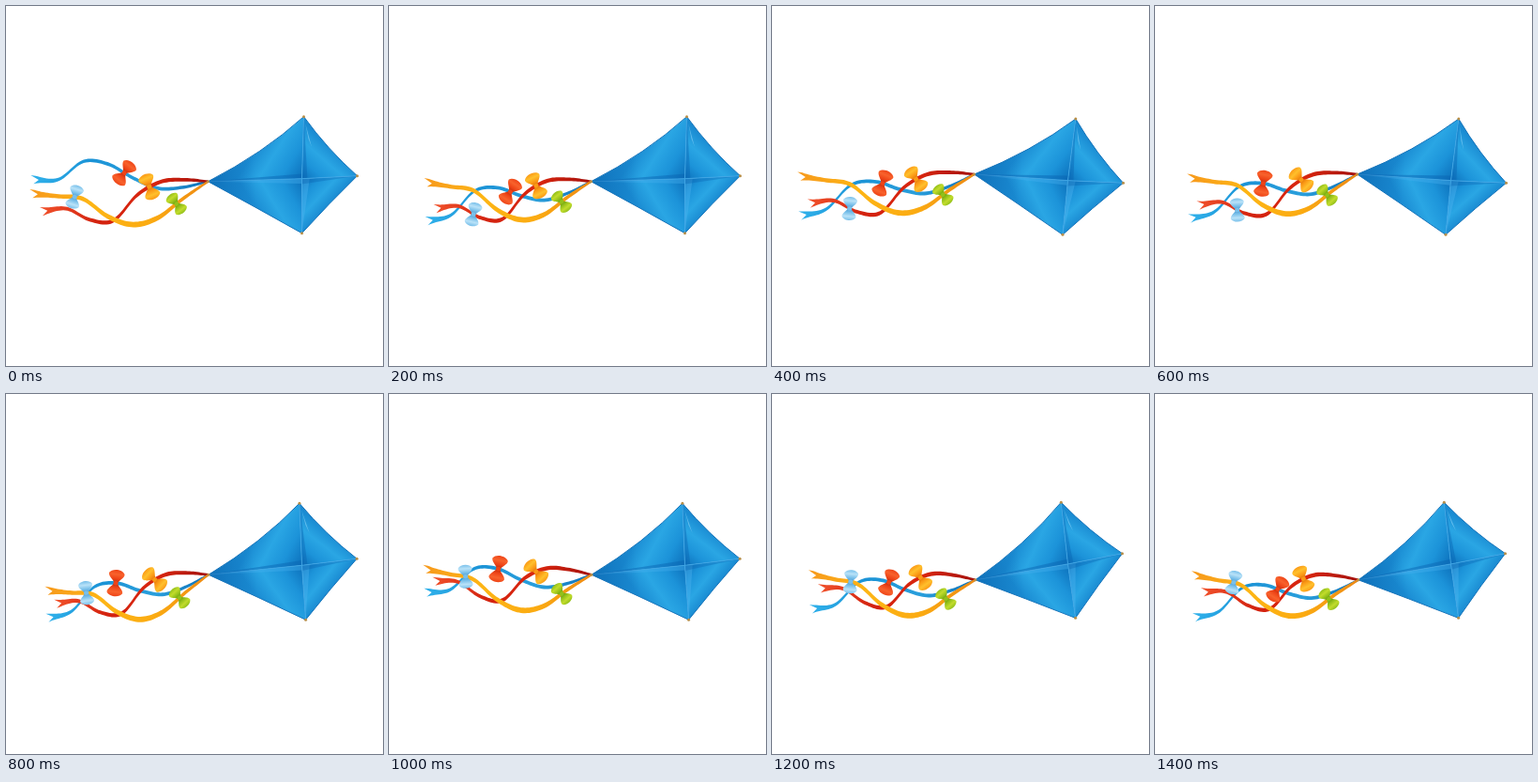
Write an HTML page with a canvas that moves like this. It is 402 px wide and 383 px high and loops after 1.6 s.

```html
<!DOCTYPE html>
<html lang="en">
<head>
<meta charset="utf-8">
<title>Kite</title>
<style>
html, body { margin: 0; width: 100%; height: 100%; overflow: hidden; background: #fff; }
canvas { display: block; }
</style>
</head>
<body>
<canvas id="stage" width="402" height="383"></canvas>
<script>
const ctx = document.getElementById('stage').getContext('2d');
const BEAT = 200, BEATS = 8;

// The kite tilts every second beat; the tails stretch and swing on each beat
const tilts = [0, 5.5, -4, -8];
const stretch = [1.07, 1, 1.06, 1.02, 0.98, 1.01, 1, 1];

// rest: heights below the knot, evenly spaced from knot to tail
const blue = {
  length: 174, width: 1.7,
  rest: [0, 12, 19, 14, 5, 8, 33, 39],
  swing: [-41, 3, 5, 8, 7, -20, -8, 1],
  tones: ['#0c70b8', '#2a9fdc', '#1b93d6', '#2fb0ea']
};
const red = {
  length: 165, width: 2,
  rest: [0, -2, 0, 14, 41, 40, 28, 31],
  swing: [1, -2, 0, 2, 0, -24, -22, -18],
  tones: ['#a3100c', '#d9260f', '#d3220f', '#f0502a']
};
const gold = {
  length: 175, width: 2.6,
  rest: [0, 17, 36, 42, 32, 12, 8, 4],
  swing: [9, -3, -2, 0, 13, -10, -10, -9],
  tones: ['#ee8a14', '#fbab12', '#fdb515', '#f79a1c']
};

// at: place along the ribbon; slip and rock vary place and angle over the loop
const bows = [
  { on: gold, at: 0.76, slip: 0, angle: 95, rock: 12, size: 12.5, tones: ['#b9e2f8', '#79c0ea', '#4a97cf'] },
  { on: blue, at: 0.53, slip: -0.05, angle: 112, rock: 15, size: 14, tones: ['#f8622c', '#ee4417', '#b92a0d'] },
  { on: red, at: 0.355, slip: 0, angle: 55, rock: 13, size: 14, tones: ['#ffc02c', '#fb9a16', '#dd7008'] },
  { on: gold, at: 0.18, slip: 0, angle: 50, rock: 3, size: 12, tones: ['#c2dc2c', '#93c01a', '#5f9410'] }
];

const mix = (p, q, t) => p.map((v, i) => v + (q[i] - v) * t);

function gradient(p, q, tones) {
  const g = ctx.createLinearGradient(...p, ...q);
  tones.forEach((c, i) => g.addColorStop(i / (tones.length - 1), c));
  return g;
}

function fillPoly(points, style) {
  ctx.beginPath();
  points.forEach(p => ctx.lineTo(...p));
  ctx.closePath();
  ctx.fillStyle = style;
  ctx.fill();
}

function line(p, q, color) {
  ctx.beginPath();
  ctx.moveTo(...p);
  ctx.lineTo(...q);
  ctx.strokeStyle = color;
  ctx.lineWidth = 0.9;
  ctx.stroke();
}

function kiteAt(beat) {
  const tilt = tilts[beat >> 1], a = tilt * Math.PI / 180;
  const turn = (x, y) => [
    315.5 + x * Math.cos(a) - y * Math.sin(a),
    183.7 + 0.35 * tilt + x * Math.sin(a) + y * Math.cos(a)
  ];
  return {
    top: turn(2, -66), right: turn(59, -3), bottom: turn(0, 58),
    left: turn(-100, 3), mid: turn(0, 0)
  };
}

// Smooth curve through evenly spaced heights
function spline(ys, t) {
  const u = t * (ys.length - 1), i = Math.min(Math.floor(u), ys.length - 2), f = u - i;
  const b = ys[i], c = ys[i + 1];
  const a = ys[i - 1] ?? 2 * b - c, d = ys[i + 2] ?? 2 * c - b;
  return b + f / 2 * (c - a + f * (2 * a - 5 * b + 4 * c - d + f * (3 * (b - c) + d - a)));
}

function ribbonPoint(r, knot, beat, s) {
  return [
    knot[0] - r.length * stretch[beat] * s,
    knot[1] + spline(r.rest, s) + r.swing[beat] * s
  ];
}

function drawRibbon(r, knot, beat) {
  const upper = [], lower = [], n = 80;
  for (let i = 0; i <= n; i++) {
    const s = i / n, [x, y] = ribbonPoint(r, knot, beat, s);
    const w = 1.2 + (r.width - 0.9) * Math.sin(Math.PI * s ** 0.8) + 3.4 * Math.exp((s - 1) * 15);
    upper.push([x, y - w]);
    lower.push([x, y + w]);
  }
  // Forked tail
  upper[n][0] -= 3;
  const tail = ribbonPoint(r, knot, beat, 1);
  const notch = ribbonPoint(r, knot, beat, 0.97);
  fillPoly([...upper, notch, ...lower.reverse()], gradient(knot, [tail[0], knot[1]], r.tones));
}

function drawBow([x, y], angle, r, [light, main, dark]) {
  ctx.save();
  ctx.translate(x, y);
  ctx.rotate(angle * Math.PI / 180);
  for (const side of [r, -r]) {
    ctx.beginPath();
    ctx.moveTo(0, -1.5);
    ctx.bezierCurveTo(side * 0.3, -4, side * 0.45, -r * 0.6, side * 0.72, -r * 0.6);
    ctx.bezierCurveTo(side * 1.1, -r * 0.4, side * 1.1, r * 0.4, side * 0.72, r * 0.6);
    ctx.bezierCurveTo(side * 0.45, r * 0.6, side * 0.3, 4, 0, 1.5);
    ctx.fillStyle = gradient([0, 0], [side, 0], [dark, main, light, main]);
    ctx.fill();
  }
  ctx.beginPath();
  ctx.ellipse(0, 0, 2.2, 2.6, 0, 0, 7);
  ctx.fillStyle = main;
  ctx.fill();
  ctx.restore();
}

function drawKite({ top, right, bottom, left, mid }) {
  const corners = [left, top, right, bottom];
  const dips = [0.15, 0.1, 0.03, 0.01];
  const side = (i, from) => {
    const p = corners[i], q = corners[(i + 1) % 4];
    if (from) ctx.moveTo(...p);
    ctx.quadraticCurveTo(...mix(mix(p, q, 0.5), mid, dips[i]), ...q);
    return mix(p, q, 0.5);
  };

  for (let i = 0; i < 4; i++) {
    ctx.beginPath();
    const outer = side(i, true);
    ctx.lineTo(...mid);
    ctx.closePath();
    ctx.fillStyle = gradient(outer, mid, ['#1a8bd2', '#2aa6e4', '#1c93d9', '#0c70bb']);
    ctx.fill();
  }

  // Folds along the spars
  fillPoly([left, mix(mid, top, 0.08), mid], 'rgba(9,98,176,.45)');
  fillPoly([left, mid, mix(mid, bottom, 0.09)], 'rgba(70,175,238,.4)');
  fillPoly([top, mix(mid, right, 0.1), mid], 'rgba(9,98,176,.4)');
  fillPoly([bottom, mid, mix(mid, right, 0.14)], 'rgba(80,180,240,.4)');
  fillPoly([right, mid, mix(mid, bottom, 0.1)], 'rgba(9,98,176,.35)');
  const glint = t => mix(mix(top, mid, t), right, t * 0.4);
  fillPoly([glint(0.08), glint(0.4), mix(glint(0.25), mid, 0.05)], 'rgba(130,206,246,.65)');
  for (const p of corners) line(p, mid, '#3fa6e6');

  ctx.beginPath();
  for (let i = 0; i < 4; i++) side(i, i === 0);
  ctx.closePath();
  ctx.fillStyle = gradient(left, mid, ['rgba(8,95,170,.6)', 'rgba(8,95,170,0)', 'rgba(8,95,170,0)']);
  ctx.fill();
  ctx.strokeStyle = '#1573ba';
  ctx.lineWidth = 1;
  ctx.stroke();

  ctx.fillStyle = '#b98f48';
  for (const p of corners) {
    ctx.beginPath();
    ctx.arc(...p, 1.5, 0, 7);
    ctx.fill();
  }
}

function draw(beat) {
  const kite = kiteAt(beat), wave = Math.cos(beat / BEATS * 2 * Math.PI);
  ctx.fillStyle = '#fff';
  ctx.fillRect(0, 0, 402, 383);
  for (const r of [blue, red, gold]) drawRibbon(r, kite.left, beat);
  bows.forEach((b, i) => {
    // The last bow crosses to the red ribbon early in the loop
    const on = i === 0 && beat > 0 && beat < 4 ? red : b.on;
    const place = ribbonPoint(on, kite.left, beat, b.at + b.slip * wave);
    drawBow(place, b.angle + b.rock * wave, b.size, b.tones);
  });
  drawKite(kite);
}

const start = performance.now();
function tick() {
  draw(Math.floor((performance.now() - start) / BEAT) % BEATS);
  requestAnimationFrame(tick);
}
tick();
</script>
</body>
</html>
```
